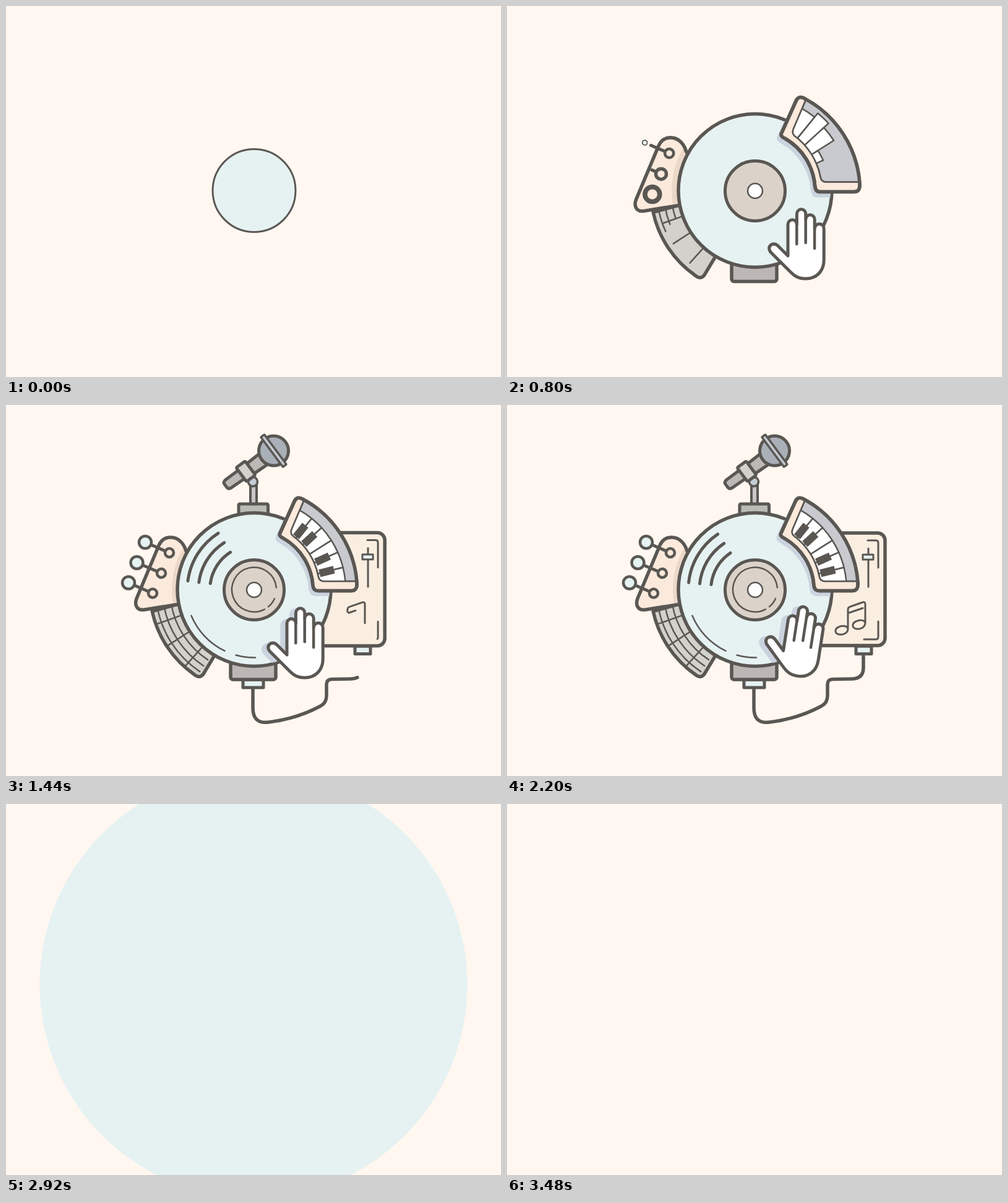
An HTML page that plays this animation: 800 by 600 pixels, repeating every 3.6 s.

```html
<!DOCTYPE html>
<html lang="en">
<head>
<meta charset="utf-8">
<title>Music machine</title>
<style>
html, body { margin: 0; width: 100%; height: 100%; overflow: hidden; background: #fff7f0; }
svg { display: block; width: 100vw; height: 100vh; }
.ln { fill: none; }
</style>
</head>
<body>
<svg id="stage" viewBox="0 0 800 600"></svg>
<script>
const LOOP = 3600, STEP = 40, CX = 401, CY = 298.5;
const INK = '#5a5753', ICE = '#e6f2f2', PEACH = '#fbe9db';
const svg = document.getElementById('stage');
const rad = a => a * Math.PI / 180;
const pt = (r, a) => (CX + r * Math.cos(rad(a))).toFixed(2) + ' ' + (CY + r * Math.sin(rad(a))).toFixed(2);

// Shapes around the record; angles run clockwise from the right.
const arc = (r, a, b) =>
  `M${pt(r, a)}A${r} ${r} 0 ${Math.abs(b - a) > 180 ? 1 : 0} ${b > a ? 1 : 0} ${pt(r, b)}`;
const sector = (r, R, a, b) => `${arc(R, a, b)}L${pt(r, b)}A${r} ${r} 0 0 0 ${pt(r, a)}Z`;
const ray = (r, R, a) => `M${pt(r, a)}L${pt(R, a)}`;

// A line that is drawn between two times.
const line = (d, w, from, to) =>
  `<path class="ln draw" pathLength="1" d="${d}" stroke-width="${w}" data-from="${from}" data-to="${to}"/>`;

const headPath = 'M305 255L291 236C287 222 277 214 266 214C256 214 250 220 247 227L211 313C207 324 212 333 224 331L305 318Z';
const keyPath = 'M443 207L466 156Q470 147 479 152A166 166 0 0 1 567 288Q568 300.5 558 300.5L504 300.5Q497 300.5 496 292A96 96 0 0 0 449 216Q440 212 443 207Z';
const panelPath = 'M482 153A166 166 0 0 1 567 285L513 285Q506 284 505 278A107 107 0 0 0 463 211Q459 207 462 200Z';
const handPath = 'M454 404V353a7.2 7.2 0 0 1 14.4 0V336a7.2 7.2 0 0 1 14.4 0V345a7.2 7.2 0 0 1 14.4 0V360a7.5 7.5 0 0 1 15 0V411C512 430 499 441 483 441C470 441 464 436 458 430L426 398Q421 391 427 386Q433 383 438 388Z';
const notePath = 'M551 362C551 369 543 372 537 371C529 370 529 362 536 359C542 356 550 357 551 362V331Q551 327 555 326L575 319Q579 318 579 322V353C578 360 571 363 565 362C557 361 557 353 564 350C570 347 578 347 579 353';
const cablePath = 'M399 458V490Q399 516 424 513C450 510 480 502 508 487Q518 482 518 470V452Q518 444 526 443.5L556 443Q576 443 576 425V404';

const pegs = [[225, 222, 264, 239], [211.5, 255, 251, 272], [198, 287.5, 237, 304.5]];
const bounds = [-61, -51, -42.5, -32.5, -24, -14, -4.5];
const blacks = [-51.5, -42.5, -24, -14];

const pegArt = pegs.map(([x, y, u, v], i) =>
  line(`M${u} ${v}L${x} ${y}`, 5, 710 + i * 45, 830 + i * 45) +
  `<circle class="screw" cx="${u}" cy="${v}" r="7" fill="${PEACH}" stroke-width="4.5"/>` +
  `<circle class="knob" cx="${x}" cy="${y}" r="10" fill="${ICE}" stroke-width="4.5"/>`).join('');

svg.innerHTML = `
<defs>
  <clipPath id="onDisc"><circle cx="${CX}" cy="${CY}" r="122"/></clipPath>
  <clipPath id="onHead"><path d="${headPath}"/></clipPath>
  <clipPath id="onPanel"><path d="${panelPath}"/></clipPath>
</defs>
<rect width="800" height="600" fill="#fff7f0"/>
<g id="scene" stroke="${INK}" stroke-linecap="round" stroke-linejoin="round">
  <g id="neck">
    <path d="M${pt(105, 170)}L${pt(168.5, 168)}A168.5 168.5 0 0 0 ${pt(168, 125)}Q313 443 319 435L${pt(115, 121)}Z" fill="#d2d1cb" stroke-width="5.5"/>
    ${[159, 148, 136].map((r, i) => line(arc(r, 170, 123.5), 2.5, 700 + i * 20, 1020 + i * 20)).join('')}
    ${[160.5, 147, 132].map(a => line(ray(124, 166, a), 2.5, 640, 840)).join('')}
  </g>
  <g id="head">
    <path d="${headPath}" fill="${PEACH}" stroke="none"/>
    <circle cx="${CX}" cy="${CY}" r="133" fill="#785a46" opacity=".12" stroke="none" clip-path="url(#onHead)"/>
    <path class="ln" d="${headPath}" stroke-width="5.5"/>
    ${pegArt}
  </g>
  <g id="plug"><rect x="383" y="444" width="33" height="13" fill="${ICE}" stroke-width="5"/></g>
  <g id="box"><rect x="363" y="400" width="73" height="44" rx="4" fill="#bcb7b5" stroke-width="5.5"/></g>
  ${line(cablePath, 5.5, 1120, 1490)}
  <g id="foot"><rect x="564" y="390" width="25" height="12.5" fill="${ICE}" stroke-width="5"/></g>
  <g id="amp">
    <rect x="440" y="207" width="171" height="182" rx="12" fill="#faeee1" stroke-width="5.5"/>
    ${line('M583 219H596Q600 219 600 223V263', 3, 1200, 1420)}
    ${line('M600 350V375Q600 379 596 379H577', 3, 1340, 1520)}
    ${line('M584 294V232', 3, 1120, 1320)}
    <rect id="slider" x="575" y="242" width="17" height="8" fill="${ICE}" stroke-width="3"/>
    <path id="note" class="ln" pathLength="1" d="${notePath}" stroke-width="3"/>
    ${line('M553 336L575 328.5', 3, 1380, 1500)}
  </g>
  <g id="stem"><rect x="395" y="124" width="10" height="42" fill="#c7c8c6" stroke-width="4"/></g>
  <g id="base"><rect x="376" y="160" width="47.5" height="30" rx="2" fill="#babbb5" stroke-width="5"/></g>
  <g id="mic">
    <circle cx="399" cy="124" r="7.5" fill="#c3cdd6" stroke-width="3.5"/>
    <g transform="translate(432.5 74) rotate(-36.5)">
      <path d="M-60 -8.5L-90 -8.5Q-96 -8 -96 -4V3Q-96 7 -90 7.5L-60 8.5Z" fill="#bcb8b6" stroke-width="5"/>
      <path d="M-48 -9L-18 -10V12L-48 11Z" fill="#bcb8b6" stroke-width="5"/>
      <rect x="-65" y="-14" width="18" height="28" rx="2" fill="#d2d1cb" stroke-width="5"/>
      <circle r="24" fill="#a9b0b8" stroke-width="5"/>
      <rect x="-3.5" y="-30" width="7" height="60" rx="1" fill="#c6cbd4" stroke-width="3.5"/>
    </g>
  </g>
  <g id="disc"><circle cx="${CX}" cy="${CY}" r="124" fill="${ICE}" stroke-width="5.5"/></g>
  <g clip-path="url(#onDisc)" fill="#cbd3df" stroke="#cbd3df" stroke-width="5.5">
    <g id="keyShade"><path d="${keyPath}" transform="translate(-4 6)"/></g>
    <g id="handShade"><path d="${handPath}" transform="translate(-8 3)"/></g>
  </g>
  <g id="grooves">
    ${line(arc(108, 187.5, 237.5), 5, 960, 1320)}
    ${line(arc(90, 187.5, 237.5), 5, 1000, 1360)}
    ${line(arc(71.5, 188, 237.5), 5, 1040, 1400)}
  </g>
  ${line(arc(110, 157.5, 115.6), 2.5, 1080, 1360)}
  ${line(arc(110, 105.5, 89), 2.5, 1160, 1400)}
  <g id="label">
    <circle cx="${CX}" cy="299" r="48.5" fill="#dbd3c9" stroke-width="5"/>
    ${line(arc(36, 62, 355), 2.5, 900, 1240)}
    ${line(arc(36, 24, 50), 2.5, 1140, 1260)}
    <circle id="hole" cx="${CX}" cy="299" r="12" fill="#fff" stroke-width="2.5"/>
  </g>
  <g id="keys">
    <path d="${keyPath}" fill="${PEACH}" stroke-width="5.5"/>
    <g id="panel">
      <path d="${panelPath}" fill="#c9cacf" stroke-width="2.5"/>
      <g clip-path="url(#onPanel)">
        ${bounds.slice(1).map(() => '<path class="white" fill="#fff" stroke-width="2.5"/>').join('')}
        ${blacks.map(() => '<path class="black" stroke-width="12.5" stroke-linecap="butt"/>').join('')}
      </g>
      <path class="ln" d="${panelPath}" stroke-width="2.5"/>
    </g>
    <path class="ln" d="${keyPath}" stroke-width="5.5"/>
  </g>
  <g id="hand">
    <path d="${handPath}" fill="#fff" stroke-width="5"/>
    <path class="ln" d="M468.3 353V385M482.7 345V383M497.1 360V392" stroke-width="4.5"/>
  </g>
</g>
<circle id="wipe" cx="400" cy="292" fill="${ICE}"/>`;

const el = Object.fromEntries([...svg.querySelectorAll('[id]')].map(e => [e.id, e]));
const all = c => [...svg.querySelectorAll('.' + c)];
const drawn = all('draw'), screws = all('screw'), knobs = all('knob');
const whiteKeys = all('white'), blackKeys = all('black');
const clamp = x => Math.max(0, Math.min(1, x));

// Eased keys: time, value, time, value...
function keyed(t, k) {
  if (t <= k[0]) return k[1];
  for (let i = 2; i < k.length; i += 2) {
    if (t < k[i]) {
      const u = (t - k[i - 2]) / (k[i] - k[i - 2]);
      return k[i - 1] + (k[i + 1] - k[i - 1]) * (1 - Math.cos(Math.PI * u)) / 2;
    }
  }
  return k[k.length - 1];
}
const pop = (t, at, dur = 260, over = 1.12) =>
  keyed(t, [at, 0, at + dur * .6, over, at + dur, 1]);

const show = (e, on) => e.style.display = on ? '' : 'none';
function scale(e, s, x = CX, y = CY) {
  show(e, s > .01);
  e.setAttribute('transform', `translate(${x} ${y}) scale(${s}) translate(${-x} ${-y})`);
}
function move(e, dy, on) {
  show(e, on);
  e.setAttribute('transform', `translate(0 ${dy})`);
}
// Scaling with a blur that follows the speed of the rim.
function swell(e, t, keys, size, x, y) {
  scale(e, keyed(t, keys), x, y);
  const speed = Math.abs(keyed(t + 4, keys) - keyed(t, keys)) / 4 * size;
  e.style.filter = speed > .03 ? `blur(${Math.min(2, speed * 10).toFixed(2)}px)` : 'none';
}

const discKeys = [-40, 0, 0, .54, 160, 1.22, 420, 1, 2640, 1, 2800, 1.015];
const labelKeys = [80, 0, 280, 1.37, 560, 1];
const keysKeys = [160, .3, 400, 1.11, 640, .99, 800, 1.018, 1000, 1];
const headKeys = [160, .35, 390, 1.07, 640, .99, 800, 1.013, 1000, 1];

function render(t) {
  show(el.scene, t < 3020);
  swell(el.disc, t, discKeys, 125);
  swell(el.label, t, labelKeys, 60, CX, 299);
  scale(el.hole, keyed(t, [100, 0, 300, 1.12, 560, 1]), CX, 299);

  const k = t < 160 ? 0 : keyed(t, keysKeys);
  scale(el.keys, k);
  scale(el.keyShade, t < 480 ? 0 : k);
  el.panel.style.opacity = clamp((t - 480) / 160);
  whiteKeys.forEach((e, i) => {
    const p = pop(t, 570 + i * 60, 260, 1.25);
    show(e, p > .02);
    e.setAttribute('d', sector(106, 106 + 42 * p, bounds[i], bounds[i + 1]));
  });
  blackKeys.forEach((e, i) => {
    const p = pop(t, 880 + i * 50);
    show(e, p > .02);
    e.setAttribute('d', ray(109, 109 + 24 * p, blacks[i]));
  });

  if (t < 160) show(el.head, false);
  else swell(el.head, t, headKeys, 170);
  pegs.forEach(([x, y, u, v], i) => {
    scale(screws[i], pop(t, 500 + i * 60, 280, 1.7), u, v);
    scale(knobs[i], pop(t, 735 + i * 60, 280, 1.2), x, y);
  });

  scale(el.neck, t < 420 ? 0 : keyed(t, [420, .6, 620, 1.04, 780, 1]));
  move(el.box, keyed(t, [540, -36, 780, 1.5, 960, 0]), t >= 540);
  move(el.plug, keyed(t, [840, -20, 1000, 9, 1160, 0]), t >= 840);
  scale(el.amp, t < 840 ? 0 : keyed(t, [840, .4, 1040, 1.14, 1240, .98, 1400, 1.006, 1700, 1]));
  scale(el.foot, pop(t, 1160), 576, 392);
  el.slider.setAttribute('y', keyed(t, [1160, 288, 1400, 242]));
  show(el.slider, t >= 1160);

  // The note grows from its beam towards both heads.
  const p = clamp((t - 1380) / 180);
  show(el.note, p > 0);
  el.note.setAttribute('stroke-dasharray', p < 1 ? `${p} 2` : 'none');
  el.note.setAttribute('stroke-dashoffset', -.6 * (1 - p));

  move(el.base, keyed(t, [820, 30, 960, -5, 1060, 0]), t >= 820);
  move(el.stem, keyed(t, [880, 44, 1040, -4, 1140, 0]), t >= 880);
  const m = pop(t, 960, 240, 1.03), tilt = keyed(t, [960, -40, 1140, 4, 1280, -2, 1440, 0]);
  show(el.mic, m > .01);
  el.mic.setAttribute('transform', `translate(399 124) rotate(${tilt}) scale(${m}) translate(-399 -124)`);

  const wave = t > 1680 && t < 2800 ? 5 * (1 - Math.cos((t - 1680) / 1120 * 6 * Math.PI)) : 0;
  const h = pop(t, 540, 240, 1.08);
  const grip = `rotate(${wave} 493 353) translate(482 440) scale(${h}) translate(-482 -440)`;
  show(el.hand, h > .01);
  el.hand.setAttribute('transform', grip);
  el.handShade.setAttribute('transform', grip);
  el.handShade.style.opacity = clamp((t - 840) / 240);
  el.grooves.setAttribute('transform', `rotate(${-wave / 6} ${CX} ${CY})`);

  for (const e of drawn) {
    const { from, to } = e.dataset, q = clamp((t - from) / (to - from));
    show(e, q > 0);
    e.setAttribute('stroke-dasharray', q < 1 ? `${q} 2` : 'none');
  }

  const w = clamp((t - 2800) / 300);
  el.wipe.setAttribute('r', 540 * (1 - (1 - w) ** 2));
  el.wipe.style.opacity = clamp(1 - (t - 3280) / 200);
}

const start = performance.now();
function tick(now) {
  const t = Math.max(0, now - start) % LOOP;
  render(Math.floor(t / STEP) * STEP);
  requestAnimationFrame(tick);
}
render(0);
requestAnimationFrame(tick);
</script>
</body>
</html>
```
